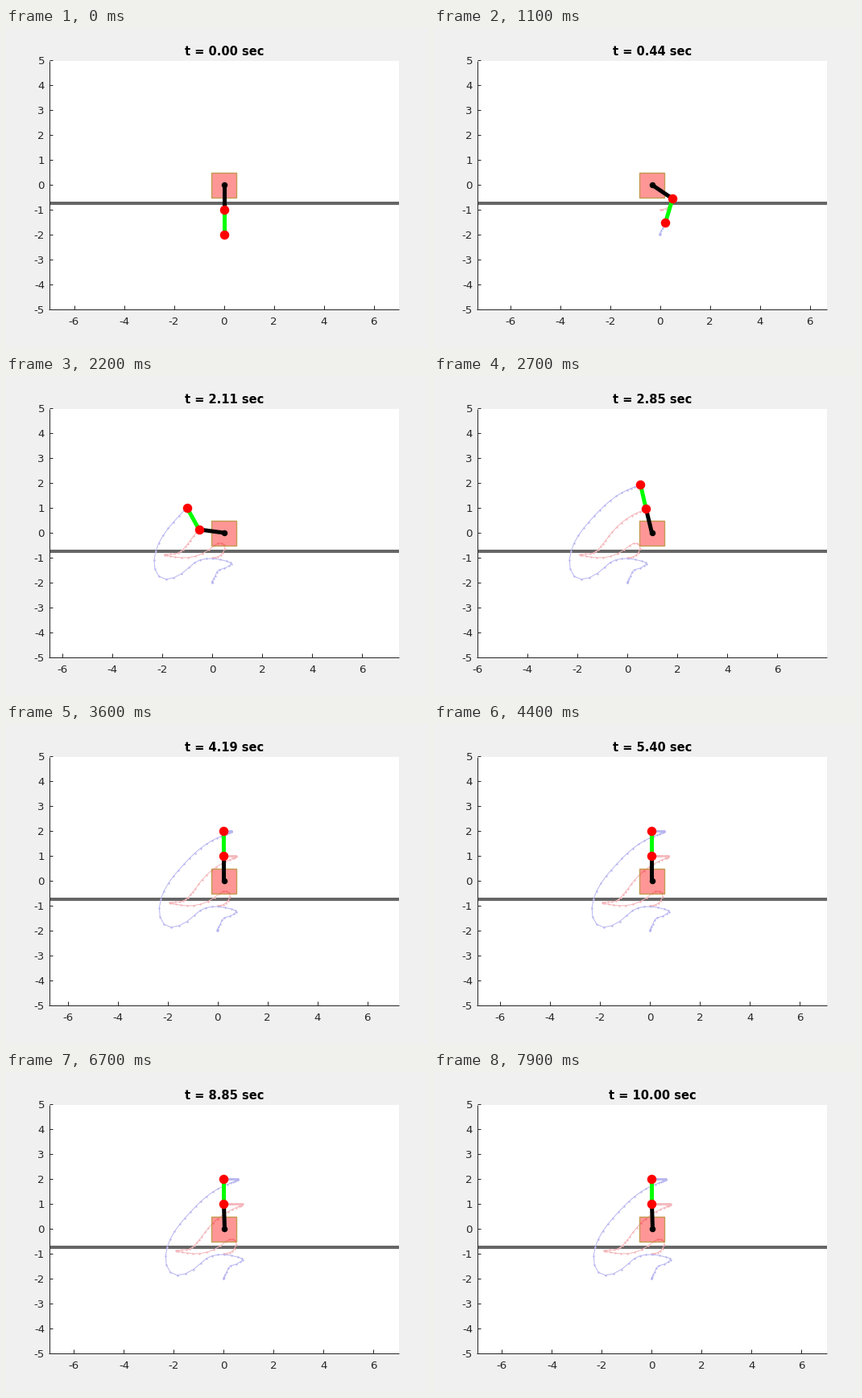
A matplotlib script for the animation above (8000 ms loop, 524 px wide and 398 px high).

```python
import numpy as np
import matplotlib.pyplot as plt
from matplotlib.animation import FuncAnimation
from matplotlib.patches import Rectangle

W, H, DPI = 524, 398, 100
FRAMES, INTERVAL = 80, 100
PX = 72 / DPI               # one pixel in points
CX, CY, S = 270.5, 195, 31  # pixel of the cart, pixels per metre
LEFT, RIGHT, TOP, BOTTOM = 53.5, 488, 41, 349.5
DARK = "#262626"
STEP, HOLD, RATE, END = 0.03352, 8, 4.47, 10.0

# Swing-up poses: time, cart position, angle of each link (degrees from hanging)
SWING = np.array([
    (0, 0, 0, 0),
    (.31, -.15, 33, -18),
    (.45, -.35, 58, -15),
    (.59, -.65, 65, 23),
    (.95, -1.1, 5, 88),
    (1.14, -1.33, -20, 75),
    (1.34, -1.44, -28.6, 22.5),
    (1.61, -.78, -36, -74),
    (1.88, -.08, -64, -129),
    (2.46, 1.01, -146, -159.5),
    (2.85, .97, -166.5, -167),
    (3.1, .82, -174, -171),
])
# Afterwards everything decays towards the upright rest pose
REST = np.array([0, -180, -180])
DECAY = np.array([1.07, 4, 4])

settle = np.arange(.25, END - 2.8, .25)[:, None]
T = np.append(SWING[:, 0], SWING[-1, 0] + settle)
V = np.vstack([SWING[:, 1:], REST + (SWING[-1, 1:] - REST) * np.exp(-DECAY * settle)])
SLOPE = np.gradient(V, T, axis=0)
SLOPE[0] = 0


def pose(t):
    """Cart position, elbow and tip at times t (cubic Hermite between poses)."""
    i = np.clip(np.searchsorted(T, t, side="right") - 1, 0, len(T) - 2)
    h = (T[i + 1] - T[i])[:, None]
    u = (t - T[i])[:, None] / h
    v = ((1 + 2 * u) * (1 - u) ** 2 * V[i] + u * (1 - u) ** 2 * h * SLOPE[i]
         + u * u * (3 - 2 * u) * V[i + 1] + u * u * (u - 1) * h * SLOPE[i + 1])
    x, a, b = v[:, 0], np.radians(v[:, 1]), np.radians(v[:, 2])
    elbow = np.array([x + np.sin(a), -np.cos(a)])
    tip = elbow + np.array([np.sin(b), -np.cos(b)])
    return x, elbow, tip


fig = plt.figure(figsize=(W / DPI, H / DPI), dpi=DPI, facecolor="#f0f0f0")
ax = fig.add_axes([0, 0, 1, 1])
ax.set_xlim(0, W)
ax.set_ylim(H, 0)
ax.axis("off")


def line(xs, ys, color, width, z, **kw):
    return ax.plot(xs, ys, color=color, lw=width * PX, zorder=z,
                   solid_capstyle="butt", **kw)[0]


def dot(color, size, z):
    return ax.plot([], [], "o", color=color, ms=size * PX, mew=0, zorder=z)[0]


def text(x, y, s, size=13.33, ha="center", **kw):
    return ax.text(x, y, s, fontsize=size * PX, ha=ha, va="baseline",
                   family="DejaVu Sans", **kw)


ax.add_patch(Rectangle((LEFT, TOP), RIGHT - LEFT, BOTTOM - TOP, fc="white", lw=0))
line([LEFT, LEFT], [TOP, BOTTOM + .5], DARK, 1, 9)
line([LEFT - .5, RIGHT], [BOTTOM, BOTTOM], DARK, 1, 9)
for n in range(-5, 6):
    y = CY - S * n
    line([LEFT, LEFT + 4.5], [y, y], DARK, 1, 9)
    text(48, y + 5, str(n), ha="right", color=DARK)

ground = CY + .75 * S
line([LEFT, RIGHT], [ground, ground], "#666666", 4, 2)
trails = [line([], [], c, 1, 3, marker="o", ms=2.4 * PX, mew=0)
          for c in ("#f4b6ba", "#b8b6f0")]
ax.add_patch(Rectangle((CX - S / 2, CY - S / 2), S, S, fc=(1, 0, 0, .41),
                       ec="#c49a50", lw=1.4 * PX, zorder=4))

link1 = line([], [], "black", 5, 5)
link2 = line([], [], "lime", 5, 5)
pivot = dot("black", 7.5, 6)
joints = dot("red", 11.5, 7)
title = text(271, 34, "", 14.67, weight="bold", color="black")
ticks = [(n, line([], [], DARK, 1, 9), text(0, 369, str(n), color=DARK))
         for n in range(-10, 11, 2)]


def draw(k):
    step = round(max(0, k - HOLD) * RATE)
    t = min(END, step * STEP)
    title.set_text(f"t = {t:.2f} sec")

    past = np.append(np.arange(0, t, 2 * STEP), t)
    xs, elbow, tip = pose(past)
    cart = xs[-1]
    ends = []
    for p, trail in zip((elbow, tip), trails):
        px, py = CX + S * (p[0] - cart), CY - S * p[1]
        trail.set_data(px, py)
        ends.append((px[-1], py[-1]))
    (ex, ey), (tx, ty) = ends

    link1.set_data([CX, ex], [CY, ey])
    link2.set_data([ex, tx], [ey, ty])
    pivot.set_data([CX], [CY])
    joints.set_data([ex, tx], [ey, ty])

    for n, mark, label in ticks:
        x = CX + S * (n - cart)
        shown = abs(n - cart) <= 7.02
        mark.set_data([x, x], [BOTTOM - 4.5, BOTTOM])
        label.set_x(x)
        mark.set_visible(shown)
        label.set_visible(shown)
    return []


anim = FuncAnimation(fig, draw, frames=FRAMES, interval=INTERVAL,
                     repeat=True, repeat_delay=0, blit=False)
plt.show()
```
